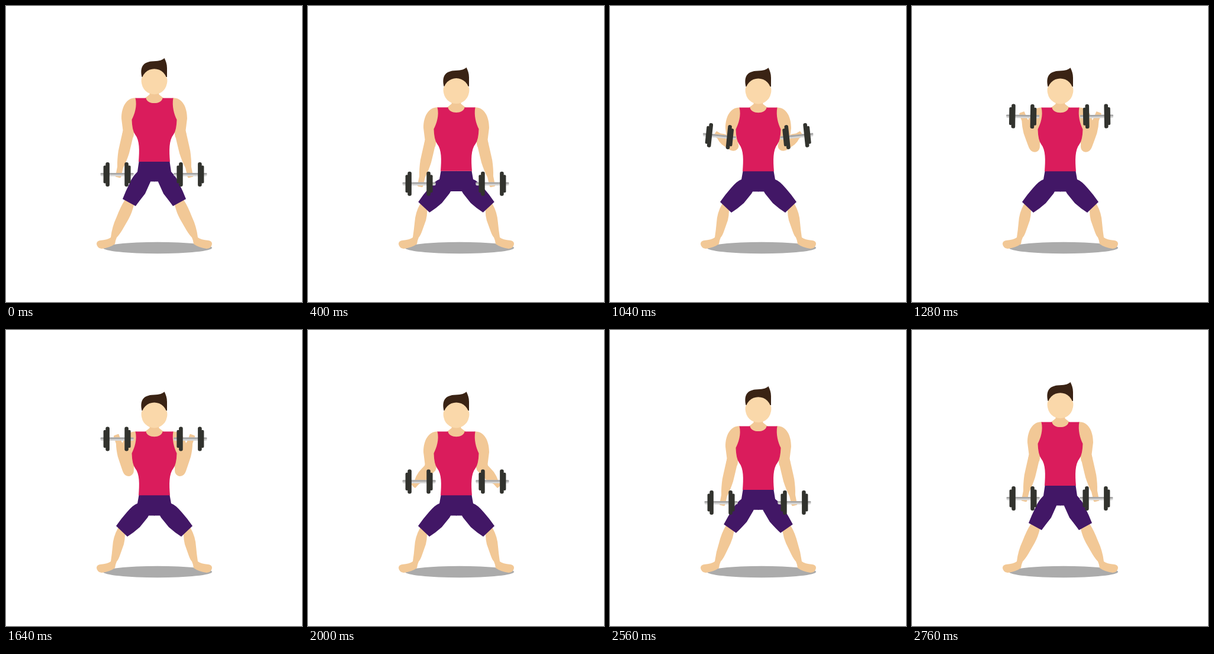
Write an HTML page with a canvas that moves like this. It is 500 px wide and 500 px high and loops after 3000 ms.

```html
<!DOCTYPE html>
<html lang="en">
<head>
<meta charset="utf-8">
<title>Squat and curl</title>
<style>
  html, body { margin: 0; height: 100%; overflow: hidden; background: #fff; }
  canvas { display: block; width: 500px; height: 500px; }
</style>
</head>
<body>
<canvas id="stage" width="500" height="500"></canvas>
<script>
const ctx = document.getElementById('stage').getContext('2d');
const LOOP = 3000, STEP = 40, DROP = 16.2, LIFT = 120;
const SKIN = '#f2c896', FACE = '#fad8aa', HAIR = '#3a2314', SHIRT = '#da1c5c',
      SHORTS = '#421766', IRON = '#32332e', SHADOW = '#ababab';

// Each track is a list of [time, value], eased between neighbours.
const SQUAT = [[0, 0], [440, 1], [2320, 1], [2760, 0]];
const CURL = [[450, 0], [1405, 1], [1567, 1], [2307, 0]];
const TILT = [[440, 0], [720, 1], [1400, 0]];
const GRIP = [[0, 5], [.38, 8], [.68, -5], [1, -7]];

const mix = (a, b, u) => a + (b - a) * u;
const smooth = u => u * u * (3 - 2 * u);

function track(keys, t) {
  if (t <= keys[0][0]) return keys[0][1];
  for (let i = 1; i < keys.length; i++) {
    const [t0, a] = keys[i - 1], [t1, b] = keys[i];
    if (t < t1) return mix(a, b, smooth((t - t0) / (t1 - t0)));
  }
  return keys[keys.length - 1][1];
}

function fill(color, path) {
  ctx.fillStyle = color;
  ctx.fill(new Path2D(path));
}

function ellipse(color, x, y, rx, ry) {
  ctx.fillStyle = color;
  ctx.beginPath();
  ctx.ellipse(x, y, rx, ry, 0, 0, 2 * Math.PI);
  ctx.fill();
}

function pill(color, x, y, w, h, r) {
  ctx.fillStyle = color;
  ctx.beginPath();
  ctx.roundRect(x, y, w, h, r);
  ctx.fill();
}

function placed(draw, x, y, angle = 0) {
  ctx.save();
  ctx.translate(x, y);
  ctx.rotate(angle);
  draw();
  ctx.restore();
}

// Draws the left half, then its reflection about x = 250.5.
function bothSides(draw) {
  draw();
  ctx.save();
  ctx.translate(501, 0);
  ctx.scale(-1, 1);
  draw();
  ctx.restore();
}

function leg(squat) {
  const p = (x0, y0, x1, y1) => `${mix(x0, x1, squat)} ${mix(y0, y1, squat)} `;
  fill(SKIN, 'M' + p(203, 322, 193, 328) + 'L' + p(200, 329, 189, 335) +
    'Q' + p(194, 338, 181, 349) + p(187, 356, 180, 366) +
    'Q' + p(179, 373, 179, 378) + '177 391 Q172 395 159 396 Q153 397 153 402 ' +
    'Q154 409 162 410 Q176 408 184 402 Q185 395 187 391 ' +
    'Q' + p(191, 387, 190, 388) + p(196, 379, 193, 379) +
    'L' + p(207, 360, 199, 362) + 'Q' + p(213, 349, 201, 354) +
    p(216, 336, 201, 345) + 'Z');
}

function shortsHalf(squat) {
  const p = (x0, y0, x1, y1) => `${mix(x0, x1, squat)} ${mix(y0, y1, squat)} `;
  fill(SHORTS, 'M' + p(251, 263, 251, 279) + 'L' + p(224.5, 263, 224.5, 279) +
    'L' + p(222, 280, 222, 293) + 'Q' + p(213, 289, 215, 295) +
    p(209, 299, 204, 308) + 'Q' + p(202, 313, 195, 318) + p(197, 326, 186, 331) +
    'L' + p(219, 338, 205, 349) + 'Q' + p(224, 331, 216, 342) +
    p(235, 317, 226, 333) + 'L' + p(244, 297, 239, 317) +
    'L' + p(244, 296.5, 241, 313.5) + 'L' + p(251, 296.5, 251, 313.5) + 'Z');
}

function upperArm() {
  fill(SKIN, 'M220 155.4 C204 154 195 170 195 190 L197.5 210 L196.5 217 ' +
    'L215 222 L217 210 L216 192 L222 170 Z');
}

// Tapers from the elbow to the fingers; foreshortening only changes its length.
function forearm(elbowY, tipX, tipY) {
  const dx = tipX - 206, dy = tipY - elbowY, length = Math.hypot(dx, dy);
  const at = k => k * length;
  placed(() => fill(SKIN, `M0 -9.5 Q${at(.25)} -9.5 ${at(.42)} -9.3
    Q${at(.62)} -8 ${at(.77)} -5 L${at(.97)} -5 Q${at(1)} -5 ${at(1)} -3
    L${at(1)} 3 Q${at(1)} 5 ${at(.97)} 4.5 L${at(.77)} 5
    Q${at(.62)} 8 ${at(.42)} 9.3 Q${at(.25)} 9.5 0 9.5
    C-16 9.5 -16 -9.5 0 -9.5 Z`), 206, elbowY, Math.atan2(dy, dx));
}

function dumbbell() {
  pill('#d6d6d6', -28, -2.5, 56, 5.5, 2);
  pill('#a6a6a6', -28, -2.5, 56, 2.8, 1);
  for (const side of [-1, 1]) {
    pill(IRON, side * 20.5 - 2.5, -15, 5, 30, 2);
    pill(IRON, side * 16 - 3.3, -20.5, 6.6, 41, 3);
  }
}

function torso() {
  fill(SKIN, 'M243 145 L258 145 L258.5 149.5 L266 155.4 L266 168 L235 168 L235 155.4 L242.5 149.5 Z');
  fill(SHIRT, 'M218.5 155.4 L236.5 155.4 C238 167 263 167 264.5 155.4 L282.5 155.4 ' +
    'C280 169 284 183 288.5 192 Q288 210 283 217 C275 227 275.5 244 277 263 ' +
    'L224 263 C225.5 244 226 227 218 217 Q213 210 212.5 192 C217 183 222 169 218.5 155.4 Z');
}

function head() {
  fill(HAIR, 'M229.5 120 C226 104 231 95 246 93.5 C257 92.5 262 93 267.5 88 ' +
    'C270 93 272 98 272 105 L272 120 Z');
  bothSides(() => ellipse(FACE, 230.3, 126, 1.7, 5.5));
  ellipse(FACE, 250.5, 127.7, 21.5, 21.5);
}

function draw(t) {
  const squat = track(SQUAT, t), curl = track(CURL, t), tilt = track(TILT, t);
  const drop = DROP * squat;
  const barY = 284.5 + drop - LIFT * curl;
  const angle = tilt * .19;

  ctx.fillStyle = '#fff';
  ctx.fillRect(0, 0, 500, 500);
  ellipse(SHADOW, 256, 408.5, 92, 9.7);
  bothSides(() => {
    leg(squat);
    placed(upperArm, 0, drop);
    forearm(216 + drop + 3 * curl, 189 - 12 * Math.sin(Math.PI * curl) - 2 * curl,
      barY + track(GRIP, curl));
  });
  bothSides(() => shortsHalf(squat));
  placed(() => { torso(); head(); }, 0, drop);
  placed(dumbbell, 187.6 - 5 * tilt, barY, angle);
  placed(dumbbell, 311.4 + 7.5 * tilt, barY, -angle);
}

function frame() {
  draw(Math.floor(performance.now() % LOOP / STEP) * STEP);
  requestAnimationFrame(frame);
}
frame();
</script>
</body>
</html>
```
